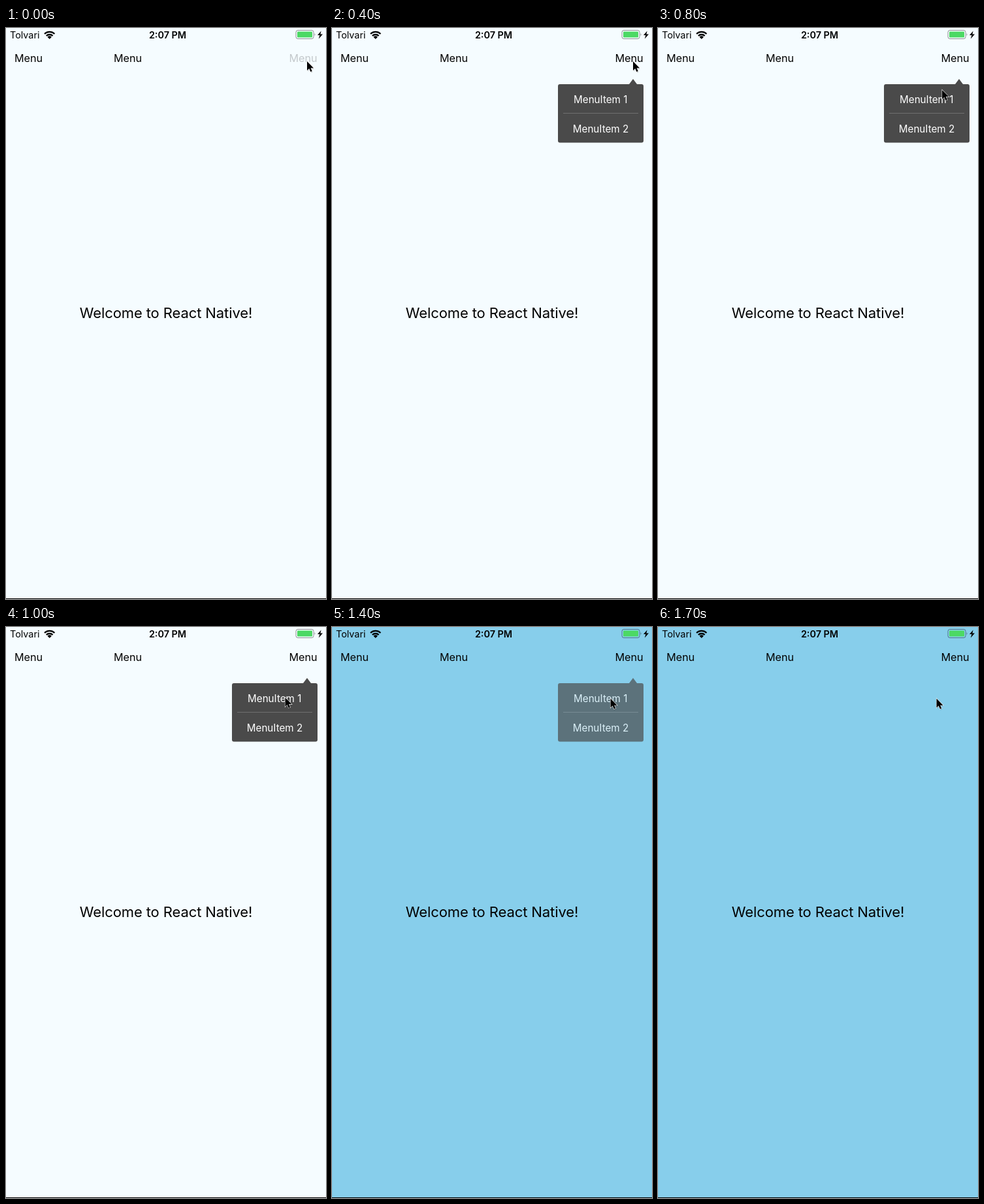
Animation, 490 px wide and 874 px high, one loop 1.8 s. Source, as an HTML page:

```html
<!DOCTYPE html>
<html lang="en">
<head>
<meta charset="utf-8">
<title>Popover menu</title>
<style>
  html, body { margin: 0; width: 100%; height: 100%; overflow: hidden; }
  svg { display: block; width: 490px; height: 874px; }
  text { font-family: Inter, "Open Sans", sans-serif; }
  .nav { font-size: 16.2px; }
  .item { font-size: 15.2px; fill: #fff; text-anchor: middle; }
  .status { font-size: 14.4px; }
</style>
</head>
<body>
<svg viewBox="0 0 490 874" xmlns="http://www.w3.org/2000/svg">
  <defs>
    <path id="arrow" d="M0 0 V14 L3.2 11 L5.4 16 L7.7 15 L5.6 10.2 H10 Z"/>
  </defs>
  <rect id="bg" width="490" height="874"/>
  <rect y="873" width="490" height="1"/>

  <text class="status" x="6" y="15.5">Tolvari</text>
  <g fill="none" stroke="#000" stroke-width="2.3">
    <path d="M59 9 A11 11 0 0 1 74.4 9"/>
    <path d="M61.8 12 A7 7 0 0 1 71.6 12"/>
  </g>
  <path d="M66.7 17 L63.5 13.7 A4.5 4.5 0 0 1 69.9 13.7 Z"/>
  <text class="status" x="247.5" y="15.5" text-anchor="middle" font-weight="600">2:07 PM</text>
  <rect x="444" y="3.5" width="27" height="13" rx="3" fill="none" stroke="#000" stroke-opacity=".42"/>
  <rect x="446" y="5.5" width="23" height="9" rx="1.2" fill="#4cd964"/>
  <path d="M472.5 8 Q474.5 10 472.5 12 Z" opacity=".42"/>
  <path d="M482.6 4.5 L477 11 H480.4 L478.8 16.5 L485 9.4 H481.4 Z"/>

  <text class="nav" x="13" y="52">Menu</text>
  <text class="nav" x="165" y="52">Menu</text>
  <text class="nav" x="433.5" y="52" id="button">Menu</text>
  <text x="245" y="443.7" text-anchor="middle" font-size="22" letter-spacing="-.1">Welcome to React Native!</text>

  <g id="popover">
    <path fill="#4a4a4a" d="M349 86 H455 L461 78 L467 86 H474 Q477 86 477 89 V172.5 Q477 175.5 474 175.5 H349 Q346 175.5 346 172.5 V89 Q346 86 349 86 Z"/>
    <rect x="354" y="130" width="115" height="1" fill="#707070"/>
    <text class="item" x="411.2" y="114.5">MenuItem 1</text>
    <text class="item" x="411.5" y="159.5">MenuItem 2</text>
  </g>

  <g id="cursor">
    <use href="#arrow" x=".8" y="1.6" opacity=".2"/>
    <use href="#arrow" stroke="#fff" stroke-width="1.1" paint-order="stroke"/>
  </g>
</svg>
<script>
  const LOOP = 1800, TICK = 100;
  const set = (id, name, value) => document.getElementById(id).setAttribute(name, value);
  const mix = (a, b, k) => a + (b - a) * k;

  // share of a step that begins at start and lasts length, from 0 to 1
  const part = (t, start, length) => Math.min(1, Math.max(0, (t - start) / length));
  const smooth = u => u * u * (3 - 2 * u);
  const easeOut = u => 1 - (1 - u) ** 2;

  function draw(t) {
    const release = smooth(part(t, 30, 250));
    const shown = smooth(part(t, 0, 280)) - smooth(part(t, 1290, 300));
    const move = easeOut(part(t, 500, 600));

    set('bg', 'fill', t < 1400 ? '#f5fcff' : '#87ceeb');
    set('button', 'opacity', mix(.2, 1, release));
    set('popover', 'opacity', shown);
    set('cursor', 'transform', `translate(${mix(461, 426.5, move)} ${mix(51, 109.5, move)})`);
  }

  function frame() {
    const t = performance.now() % LOOP;
    draw(Math.floor(t / TICK) * TICK);
    requestAnimationFrame(frame);
  }
  frame();
</script>
</body>
</html>
```
